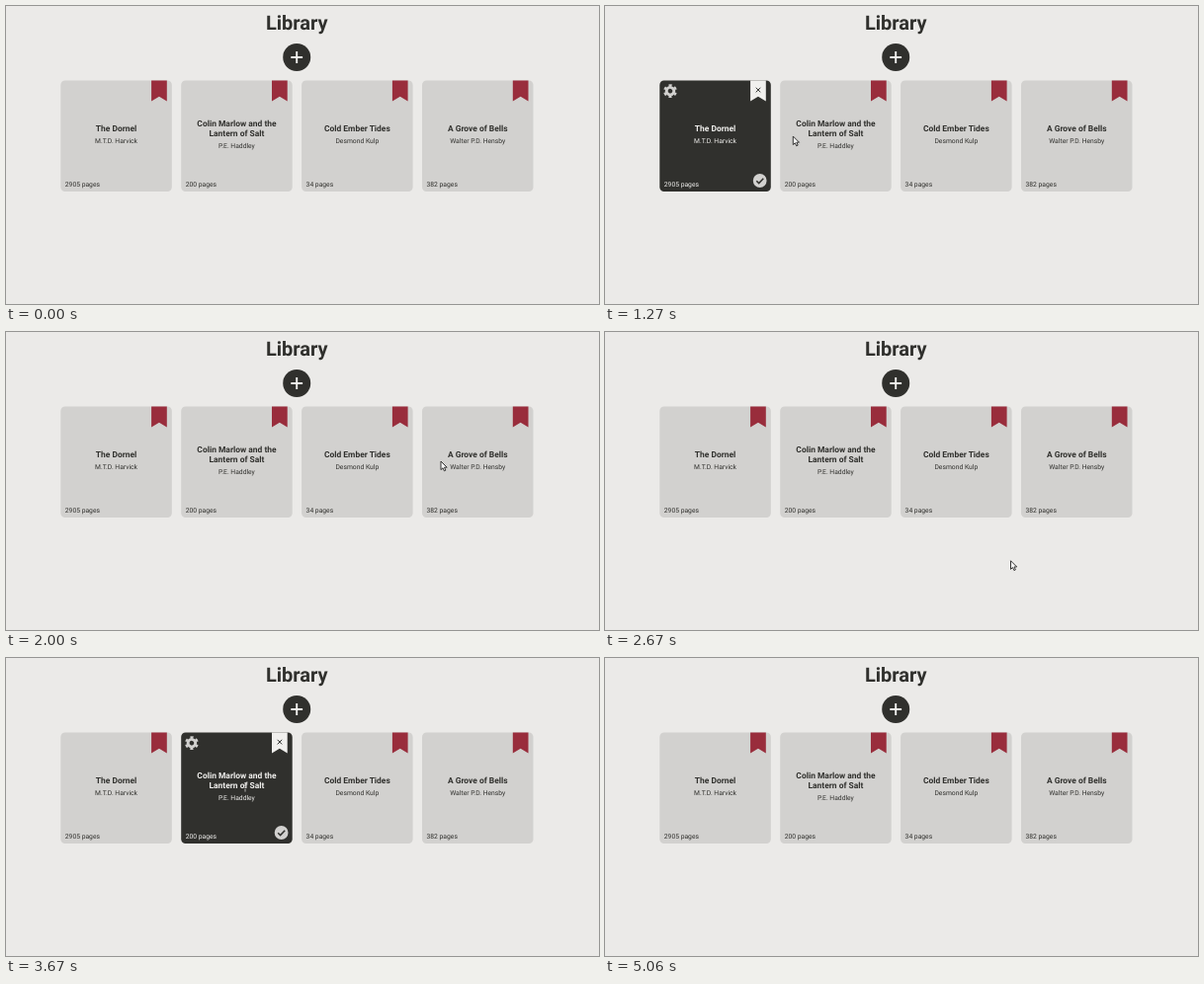
An HTML page for the animation above (5450 ms loop, 600x302 px).

```html
<!DOCTYPE html>
<html lang="en">
<head>
<meta charset="utf-8">
<title>Library</title>
<style>
  html, body { margin: 0; width: 100%; height: 100%; overflow: hidden; background: #ebeae8; }
  svg { display: block; width: 600px; height: 302px; font-family: Roboto, sans-serif; text-rendering: geometricPrecision; }
  text { fill: #30302d; }
  .mid { text-anchor: middle; }
  .head { font-size: 20px; font-weight: 700; }
  .title { font-size: 8.45px; font-weight: 700; }
  .small { font-size: 6.75px; }
  .box { fill: #d2d1cf; }
  .mark { fill: #992d3c; }
  .tools { visibility: hidden; }
  .on .box { fill: #30302d; }
  .on text { fill: #f1f0ee; }
  .on .mark { fill: #f1f0ee; }
  .on .tools { visibility: visible; }
</style>
</head>
<body>
<svg id="stage" viewBox="0 0 600 302">
  <text class="head mid" x="294.3" y="24">Library</text>
  <circle cx="294.2" cy="52" r="14" fill="#30302d"/>
  <path d="M288.3 52h11.8M294.2 46.1v11.8" stroke="#f1f0ee" stroke-width="1.9"/>
  <g id="cards"></g>
  <g id="arrow">
    <path d="M0 0V8.6L2 6.8L3.4 9.8L4.9 9.1L3.5 6.2H6.2Z" fill="#f6f6f5" stroke="#222" stroke-width=".9" stroke-linejoin="round"/>
  </g>
  <path id="beam" d="M0 -4V6" stroke="#f1f0ee" stroke-width="1" stroke-dasharray="1.4 1"/>
</svg>
<script>
const LOOP = 5450, PITCH = 121.9, LEFT = 55.3, TOP = 75.5, SIZE = 112.5;

const books = [
  { title: ["The Dornel"], author: "M.T.D. Harvick", pages: 2905 },
  { title: ["Colin Marlow and the", "Lantern of Salt"], author: "P.E. Haddley", pages: 200 },
  { title: ["Cold Ember Tides"], author: "Desmond Kulp", pages: 34 },
  { title: ["A Grove of Bells"], author: "Walter P.D. Hensby", pages: 382 }
];

// Bursts of pointer movement: start, end, number of steps
const bursts = [
  [270, 790, 9], [880, 1390, 9], [1450, 1940, 8], [2000, 2120, 3], [2270, 2790, 9],
  [2880, 3330, 8], [3550, 3790, 5], [3940, 4450, 9], [4550, 5060, 9]
];

// Pointer path: time, x, y
const path = [
  [270, 531, 285], [530, 320, 252], [790, 127, 222], [880, 119, 196], [943, 111.8, 173],
  [1070, 116, 146], [1200, 158, 136], [1262, 190, 132], [1390, 262, 128],
  [1450, 293, 125], [1520, 299.8, 122], [1660, 335, 124], [1940, 417, 130],
  [2000, 440, 131], [2120, 470, 134], [2270, 471, 142], [2465, 452, 184],
  [2660, 410.5, 231.8], [2790, 372, 239], [2880, 335, 236], [3070, 200, 205],
  [3200, 140, 165], [3330, 116, 140], [3550, 150, 134], [3610, 196, 131],
  [3670, 242, 130], [3790, 268, 131], [3940, 280, 131], [4068, 318, 132],
  [4450, 405, 132], [4550, 439.8, 133], [4742, 515, 126], [4996, 598, 104]
];

const $ = id => document.getElementById(id);

function cardMarkup({ title, author, pages }, i) {
  const mid = SIZE / 2, shift = (title.length - 1) * 4.8;
  const lines = title.map((s, n) =>
    `<text class="title mid hit" x="${mid}" y="${51.3 - shift + n * 9.7}">${s}</text>`).join("");
  return `<g class="card" transform="translate(${LEFT + i * PITCH} ${TOP})">
    <rect class="box" width="${SIZE}" height="${SIZE}" rx="4.4"/>
    <path class="mark" d="M91.8 0H107.5V20.9L99.65 16.2L91.8 20.9Z"/>
    ${lines}
    <text class="small mid hit" x="${mid}" y="${63.9 + shift}">${author}</text>
    <text class="small" x="4.5" y="107.6">${pages} pages</text>
    <g class="tools">
      <path d="M97.4 7.3l4.6 4.6m0 -4.6l-4.6 4.6" stroke="#30302d" stroke-width="1"/>
      <g transform="translate(10.7 10.7) rotate(15)" fill="none" stroke="#d2d1cf">
        <circle r="3.8" stroke-width="2.9"/>
        <circle r="5.8" stroke-width="2.2" pathLength="12" stroke-dasharray="1 1"/>
      </g>
      <circle cx="101.4" cy="101.5" r="6.9" fill="#d2d1cf"/>
      <path d="M98 101.7l2.4 2.4l4.6 -4.8" fill="none" stroke="#30302d" stroke-width="1.5"/>
    </g>
  </g>`;
}

$("cards").innerHTML = books.map(cardMarkup).join("");
const cards = [...document.querySelectorAll(".card")];

// Hold the time at the latest pointer step
function snap(t) {
  let held = 0;
  for (const [start, end, n] of bursts) {
    if (t < start) break;
    const step = (end - start) / (n - 1);
    held = start + step * Math.min(n - 1, Math.floor((t - start + 6) / step));
  }
  return held;
}

function pointerAt(t) {
  const next = path.findIndex(p => p[0] > t);
  if (next === 0) return null;
  if (next < 0) return t < 5050 ? path.at(-1).slice(1) : null;
  const [t0, x0, y0] = path[next - 1], [t1, x1, y1] = path[next];
  const k = (t - t0) / (t1 - t0);
  return [x0 + (x1 - x0) * k, y0 + (y1 - y0) * k];
}

function cardAt(point) {
  if (!point || point[1] < TOP || point[1] > TOP + SIZE) return -1;
  const x = point[0] - LEFT, i = Math.floor(x / PITCH);
  return x - i * PITCH <= SIZE ? i : -1;
}

function overText([x, y], i) {
  if (i < 0 || i >= cards.length) return false;
  const lx = x - LEFT - i * PITCH, ly = y - TOP;
  return [...cards[i].querySelectorAll(".hit")].some(el => {
    const b = el.getBBox();
    return lx >= b.x && lx <= b.x + b.width && ly >= b.y && ly <= b.y + b.height;
  });
}

function place(el, point, shown) {
  el.style.visibility = shown ? "visible" : "hidden";
  if (shown) el.setAttribute("transform", `translate(${point})`);
}

function draw(time) {
  const now = snap(time % LOOP), point = pointerAt(now);
  // The highlight trails the pointer by one step
  const lit = cardAt(pointerAt(snap(now - 10)));
  cards.forEach((card, i) => card.classList.toggle("on", i === lit));
  const typing = !!point && cardAt(point) === lit && overText(point, lit);
  place($("arrow"), point, !!point && !typing);
  place($("beam"), point, typing);
}

const begin = performance.now();
function tick() {
  draw(performance.now() - begin);
  requestAnimationFrame(tick);
}
tick();
</script>
</body>
</html>
```
